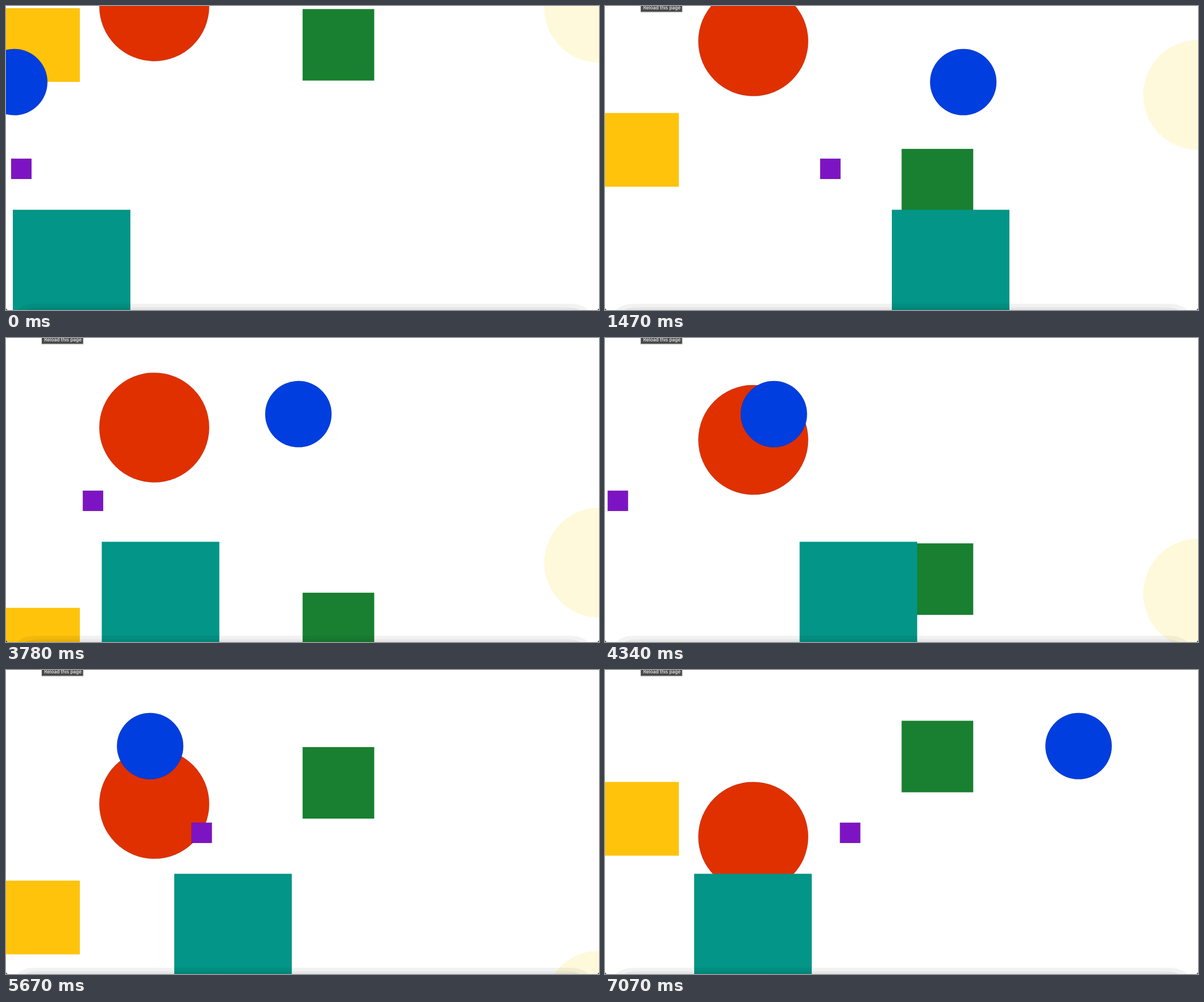
These frames come from a looping animation (1044x536 px, 7.14 s). An HTML page:

```html
<!DOCTYPE html>
<html lang="en">
<head>
<meta charset="utf-8">
<title>Bouncing shapes</title>
<style>
  html, body { margin: 0; width: 100%; height: 100%; overflow: hidden; background: #fff; }
  svg { display: block; width: 1044px; height: 536px; }
  .edged { stroke: #000; stroke-opacity: .18; stroke-width: .8; }
  text { font: 500 8.3px Inter, Roboto, sans-serif; fill: #f4f4f4; }
</style>
</head>
<body>
<svg viewBox="0 0 1044 536">
  <defs>
    <linearGradient id="shade" x1="0" y1="0" x2="0" y2="1">
      <stop offset="0" stop-opacity=".025"/>
      <stop offset="1" stop-opacity=".07"/>
    </linearGradient>
  </defs>

  <rect id="amber" x="-1" width="131" height="130" fill="#ffc30b"/>
  <circle id="cream" cx="1044.5" r="97" fill="#fff9db"/>
  <circle id="red" class="edged" cx="261" r="96.7" fill="#e03000"/>
  <circle id="blue" class="edged" cy="134.2" r="58.4" fill="#003ee0"/>
  <rect id="green" x="522.2" width="126.1" height="126.1" fill="#188030"/>
  <rect id="purple" class="edged" y="269.2" width="35.8" height="35.8" fill="#7d14c4"/>
  <rect id="teal" y="359.3" width="207" height="207" fill="#039587"/>

  <!-- soft dock edge and window corners -->
  <path d="M19 536C28 528 38 525 52 525H992C1006 525 1016 528 1025 536Z" fill-opacity=".05"/>
  <path d="M34 536C42 532 50 530.5 62 530.5H982C994 530.5 1002 532 1010 536Z" fill="url(#shade)"/>
  <path d="M0 532.5Q.5 535.5 3 536H0ZM1044 532.5Q1043.5 535.5 1041 536H1044Z" fill="#222"/>

  <g id="tooltip">
    <rect x="62" y="-5" width="75" height="17" rx="1" fill-opacity=".1"/>
    <rect x="63" y="-6" width="72.7" height="16.3" fill="#4b4b4b"/>
    <text x="67.2" y="5.8">Reload this page</text>
  </g>
</svg>
<script>
const FRAME = 70, LOOP = 7140, TOOLTIP_AT = 560;
const UNIT = 0.725; // stage pixels per page pixel

// The page advances about four ticks per shown frame, with slight jitter: [frame, tick].
const pace = [[0, 0], [21, 85], [35, 139], [54, 217], [62, 247], [81, 325], [101, 405]];

// speed is in page pixels per tick; low and high are the turning points.
const movers = [
  { id: 'amber',  attr: 'y',  start: 3.8,  speed: 3,   low: -4,    high: 541.025 },
  { id: 'cream',  attr: 'cy', start: 2.9,  speed: 2.5, low: 0,     high: 1000 },
  { id: 'red',    attr: 'cy', start: 0.5,  speed: 1,   low: 0,     high: 1000 },
  { id: 'blue',   attr: 'cx', start: 14.5, speed: 10,  low: -7.25, high: 1051.25 },
  { id: 'green',  attr: 'y',  start: 5.4,  speed: 4,   low: -3.3,  high: 541.9 },
  { id: 'purple', attr: 'x',  start: 9.1,  speed: 6,   low: -3.95, high: 544.15 },
  { id: 'teal',   attr: 'x',  start: 12,   speed: 8,   low: -5.4,  high: 545.6 }
];
for (const m of movers) m.node = document.getElementById(m.id);
const tooltip = document.getElementById('tooltip');

function tickAt(frame) {
  const i = pace.findIndex(([f]) => f >= frame);
  if (i < 1) return 0;
  const [f0, t0] = pace[i - 1], [f1, t1] = pace[i];
  return Math.round(t0 + (t1 - t0) * (frame - f0) / (f1 - f0));
}

function bounce(distance, low, high) {
  const span = high - low;
  const d = (distance - low) % (2 * span);
  return low + span - Math.abs(span - d);
}

function draw() {
  const frame = Math.floor(performance.now() % LOOP / FRAME);
  const tick = tickAt(frame);
  for (const { node, attr, start, speed, low, high } of movers)
    node.setAttribute(attr, bounce(start + speed * UNIT * tick, low, high).toFixed(3));
  tooltip.style.visibility = frame * FRAME >= TOOLTIP_AT ? 'visible' : 'hidden';
  requestAnimationFrame(draw);
}
draw();
</script>
</body>
</html>
```
